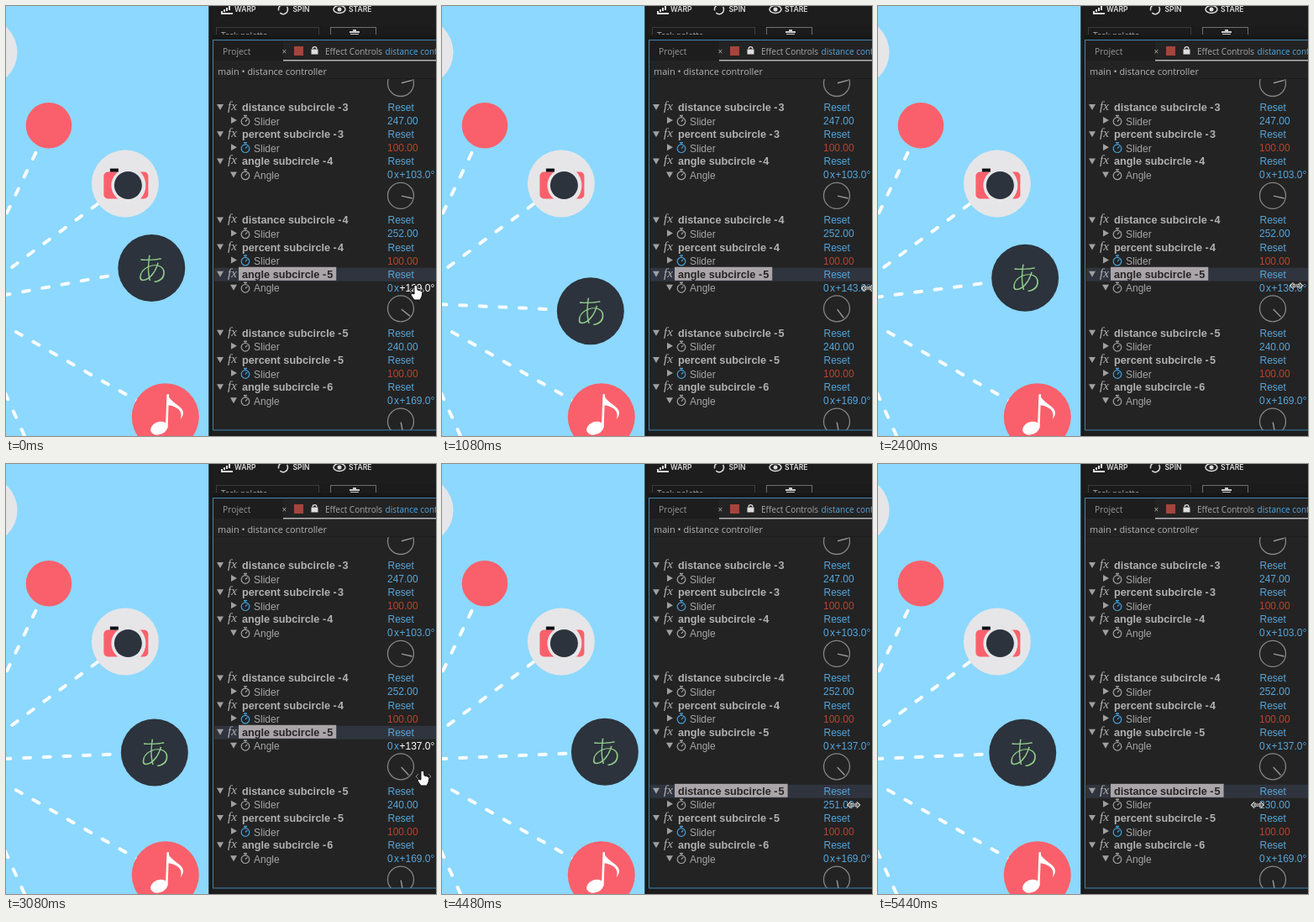
An HTML page with a canvas that plays this animation: 512 by 512 pixels, repeating every 5.48 s.

```html
<!DOCTYPE html>
<html>
<head>
<meta charset="utf-8">
<style>
html, body { margin: 0; width: 100%; height: 100%; overflow: hidden; background: #1a1a1a; }
canvas { display: block; }
</style>
</head>
<body>
<canvas id="stage" width="512" height="512"></canvas>
<script>
const g = document.getElementById('stage').getContext('2d');
const LOOP = 5480, STEP = 40, LAG = 400;
const HUB = { x: -50, y: 353 }, SCALE = 0.946, ANGLE_ZERO = 139.4;
const SANS = '"Liberation Sans", Arial, sans-serif';
const HUMAN = '"Open Sans", "Noto Sans", sans-serif';
const BLUE = '#56a7dc', RED = '#fa606b', DARK = '#2c333c', PALE = '#e6e6e9';

const angleKeys = [[0, 129], [80, 129], [600, 142], [1050, 143.4], [1260, 141], [1640, 133], [1950, 131.6], [2450, 137]];
const distKeys = [[3650, 240], [4000, 257], [4230, 260], [4500, 250.5], [4880, 238], [5060, 234.8], [5440, 230]];

function at(keys, t) {
  if (t <= keys[0][0]) return keys[0][1];
  for (let i = 1; i < keys.length; i++) {
    const [t0, a] = keys[i - 1], [t1, b] = keys[i];
    if (t < t1) return a + (b - a) * (t - t0) / (t1 - t0);
  }
  return keys[keys.length - 1][1];
}

function box(x, y, w, h, color) {
  g.fillStyle = color;
  g.fillRect(x, y, w, h);
}

function disc(x, y, r, color) {
  g.fillStyle = color;
  g.beginPath();
  g.arc(x, y, r, 0, 7);
  g.fill();
}

function ring(x, y, r, color, width = 1.3, from = 0, to = 2 * Math.PI) {
  g.strokeStyle = color;
  g.lineWidth = width;
  g.beginPath();
  g.arc(x, y, r, from, to);
  g.stroke();
}

function line(points, color, width = 1) {
  g.strokeStyle = color;
  g.lineWidth = width;
  g.beginPath();
  points.forEach(p => g.lineTo(...p));
  g.stroke();
}

function text(s, x, y, color, font = '12px ' + SANS) {
  g.font = font;
  g.fillStyle = color;
  g.fillText(s, x, y);
}

function clipped(x, y, w, h, draw) {
  g.save();
  g.beginPath();
  g.rect(x, y, w, h);
  g.clip();
  draw();
  g.restore();
}

function polar(angle, dist) {
  const a = (angle - ANGLE_ZERO) * Math.PI / 180;
  return [HUB.x + Math.cos(a) * dist * SCALE, HUB.y + Math.sin(a) * dist * SCALE];
}

function spoke(angle, dist) {
  const end = polar(angle, dist);
  g.save();
  g.lineCap = 'round';
  g.setLineDash([8, 15.7]);
  line([[HUB.x, HUB.y], end], '#fafdff', 4);
  g.restore();
  return end;
}

function camera(x, y) {
  disc(x, y, 40, PALE);
  g.fillStyle = RED;
  g.beginPath();
  g.roundRect(x - 25.5, y - 14, 53, 32, 5);
  g.fill();
  box(x - 9, y - 14, 26, 32, PALE);
  disc(x + 3.5, y + 2, 20, PALE);
  ring(x + 1, y + 2, 22.5, PALE, 2, -0.8, 0.8);
  disc(x + 3.5, y + 2, 16.5, DARK);
  box(x - 18, y - 18, 10, 4, '#0b0d10');
}

function note(x, y) {
  disc(x, y, 40, RED);
  g.fillStyle = '#fff';
  g.beginPath();
  g.ellipse(x - 7.5, y + 13.5, 10.5, 7.5, -0.4, 0, 7);
  g.fill();
  line([[x + 1.5, y + 13], [x + 3, y - 27]], '#fff', 2.6);
  g.beginPath();
  g.moveTo(x + 3, y - 27);
  g.bezierCurveTo(x + 6, y - 14, x + 30, y - 12, x + 18, y + 3);
  g.bezierCurveTo(x + 22, y - 8, x + 12, y - 13, x + 3, y - 14);
  g.fill();
}

// Trimming the outline gives the letter a light weight.
function kanaDisc(x, y) {
  disc(x, y, 40, DARK);
  g.textAlign = 'center';
  text('あ', x + 0.5, y + 14.5, '#90cb8b', '39px "Noto Sans CJK JP", "Noto Sans CJK", sans-serif');
  g.strokeStyle = DARK;
  g.lineWidth = 1.3;
  g.strokeText('あ', x + 0.5, y + 14.5);
  g.textAlign = 'left';
}

function drawComp(t) {
  const angle = Math.round(at(angleKeys, t - LAG));
  const dist = at(distKeys, t - LAG);
  clipped(0, 0, 241.5, 512, () => {
    box(0, 0, 242, 512, '#8cd8fe');
    disc(-27, 55, 40.5, PALE);
    spoke(205, 250);
    const red = spoke(75, 247), cam = spoke(103, 252);
    const kana = spoke(angle, dist), song = spoke(169, 291.5);
    disc(...red, 27.3, RED);
    camera(...cam);
    note(...song);
    kanaDisc(...kana);
  });
}

function drawHeader() {
  const caps = '600 8.6px Inter, sans-serif';
  for (let i = 0; i < 4; i++) box(256 + i * 3, 6 - i * 2, 2, 2 + i, '#ddd');
  box(256, 8, 14, 2, '#ddd');
  text('WARP', 272, 7, '#ddd', caps);
  ring(330, 4, 5.5, '#ddd', 1.5, -0.6, 2.3);
  ring(330, 4, 5.5, '#ddd', 1.5, 2.9, 4.6);
  text('SPIN', 341.5, 7, '#ddd', caps);
  g.strokeStyle = '#ddd';
  g.beginPath();
  g.ellipse(397, 4, 7, 4.5, 0, 0, 7);
  g.stroke();
  disc(397, 4, 2.5, '#ddd');
  text('STARE', 408, 7, '#ddd', caps);

  box(250, 24, 262, 11, '#1b1b1b');
  clipped(250, 24, 262, 10, () => {
    g.lineWidth = 1;
    g.strokeStyle = '#3c3c3c';
    g.strokeRect(250.5, 25.5, 122, 14);
    text('Task palette', 256, 38.5, '#aaa', '10px ' + HUMAN);
    g.strokeStyle = '#707070';
    g.strokeRect(386.5, 25.5, 54, 14);
    box(409, 30, 12, 2, '#ccc');
    box(413, 28, 4, 2, '#ccc');
    box(410, 33, 10, 3, '#ccc');
  });
  box(246, 35, 266, 5, '#171717');

  box(247, 41, 265, 464, '#232323');
  box(248, 42, 264, 23, '#1d1d1d');
  box(330, 42, 182, 23, '#232323');
  text('Project', 258, 58, '#999', '10.3px ' + HUMAN);
  text('×', 328.5, 57.5, '#aaa', '10px ' + HUMAN);
  box(343, 48, 11, 11, '#a4453b');
  box(363.5, 51.5, 8, 6, '#ddd');
  ring(367.5, 51, 2.4, '#ddd', 1.3, Math.PI, 2 * Math.PI);
  text('Effect Controls', 380, 58, '#a8a8a8', '10px ' + HUMAN);
  text('distance controller', 451.5, 58, BLUE, '10px ' + HUMAN);
  box(330, 64, 182, 1.5, '#b5b5b5');
  text('main • distance controller', 252, 82, '#b5b5b5', '10.9px ' + HUMAN);
  box(248, 86, 264, 1, '#1c1c1c');
}

function arrow(x, y, open) {
  g.fillStyle = '#a0a0a0';
  g.beginPath();
  const pts = open ? [[-4, -3], [4, -3], [0, 4]] : [[-3, -4], [4, 0], [-3, 4]];
  pts.forEach(([dx, dy]) => g.lineTo(x + dx, y + dy));
  g.fill();
}

function stopwatch(x, y, color) {
  ring(x, y + 0.5, 4.8, color, 1.2);
  line([[x - 2, y - 6.5], [x + 2, y - 6.5]], color, 1.4);
  line([[x, y - 6], [x, y - 4]], color, 1.2);
  line([[x, y + 0.5], [x + 2.4, y - 2]], color, 1.2);
}

function dial(y, angle) {
  const a = (angle - 90) * Math.PI / 180;
  ring(470, y, 15.5, '#858585');
  line([[470 + Math.cos(a), y + Math.sin(a)], [470 + Math.cos(a) * 14, y + Math.sin(a) * 14]], '#999', 1.4);
}

function effect(type, n, y, value, selected, hot) {
  const isAngle = type === 'angle', isPercent = type === 'percent';
  const label = `${type} subcircle -\u200a${n}`, font = 'bold 12.7px ' + SANS;
  if (selected) {
    box(248, y - 8, 264, 16, '#30343e');
    g.font = font;
    box(277, y - 9, g.measureText(label).width + 8, 16, '#aaa5a8');
  }
  arrow(255, y - 1, true);
  text('fx', 264, y + 3, '#b4b4b4', 'italic 15px "Liberation Serif", serif');
  text(label, 281, y + 4, selected ? '#242424' : '#b2b2b2', font);
  text('Reset', 454.5, y + 4, BLUE);

  const row = y + 16;
  arrow(271, row - 1, isAngle);
  stopwatch(285, row, isPercent ? '#479ed6' : '#a4a4a4');
  text(isAngle ? 'Angle' : 'Slider', 295, row + 4.5, '#a6a6a6');
  const color = hot ? '#fff' : isPercent ? '#b6432f' : BLUE;
  if (isAngle) {
    text('0', 454, row + 4, BLUE);
    text('x', 462, row + 4, BLUE);
    text(`+${value.toFixed(1)}°`, 468.5, row + 4, color);
    dial(y + 40.5, value);
  } else {
    text(value.toFixed(2), 454, row + 4, color);
  }
}

function drawEffects(t) {
  const angles = { 4: 103, 5: Math.round(at(angleKeys, t)), 6: 169 };
  const dists = { 3: 247, 4: 252, 5: Math.round(at(distKeys, t)) };
  const picked = t < 3480 ? 'angle' : 'distance';
  const hotAngle = t < 80 || (t > 2500 && t < 3200);
  const hotDist = t > 3400 && t < 3600;
  clipped(248, 87, 264, 418, () => {
    dial(92, 75);
    let y = 121;
    for (let n = 3; n <= 6; n++) {
      for (const type of ['angle', 'distance', 'percent']) {
        if (n === 3 && type === 'angle') continue;
        const value = type === 'angle' ? angles[n] : type === 'distance' ? dists[n] : 100;
        const five = n === 5;
        effect(type, n, y, value, five && type === picked,
          five && (type === 'angle' ? hotAngle : type === 'distance' && hotDist));
        y += type === 'angle' ? 70 : 32.2;
        if (n === 6) break;
      }
    }
  });
}

function dragCursor(x, y) {
  const shape = [[[x - 3, y - 3], [x - 6, y], [x - 3, y + 3]], [[x + 3, y - 3], [x + 6, y], [x + 3, y + 3]], [[x - 6, y], [x + 6, y]]];
  shape.forEach(s => line(s, '#e4e4e4', 3));
  shape.forEach(s => line(s, '#222', 1));
}

function handCursor(x, y) {
  g.save();
  g.translate(x, y);
  line([[-5, 1], [-8, 4], [-5, 7]], '#888');
  line([[7, 1], [10, 4], [7, 7]], '#888');
  g.beginPath();
  [[-2, -2], [0, -3], [1.5, -2], [2, 3], [6, 4], [8, 6], [7, 11], [5, 15], [-2, 15], [-6, 9], [-5, 7], [-2, 8]]
    .forEach(p => g.lineTo(...p));
  g.closePath();
  g.fillStyle = '#fff';
  g.fill();
  g.strokeStyle = '#111';
  g.lineWidth = 1;
  g.stroke();
  g.restore();
}

function drawCursor(t) {
  const handX = [[2500, 499], [3080, 496], [3460, 471]];
  const handY = [[2500, 335], [2800, 338], [3080, 368], [3460, 405]];
  if (t < 80) handCursor(488, 335);
  else if (t < 2500) dragCursor(488 + (at(angleKeys, t) - 129) * 1.36, t < 1200 ? 336 : 333);
  else if (t < 3600) handCursor(at(handX, t), at(handY, t));
  else dragCursor(470 + (at(distKeys, t) - 240) * 1.81, 406);
}

function frame() {
  const t = Math.floor(performance.now() % LOOP / STEP) * STEP;
  box(0, 0, 512, 512, '#1d1d1d');
  drawComp(t);
  drawHeader();
  drawEffects(t);
  box(241.5, 0, 4.5, 512, '#1a1a1a');
  g.strokeStyle = '#3f85b0';
  g.lineWidth = 1;
  g.strokeRect(246.5, 40.5, 300, 464.5);
  drawCursor(t);
  requestAnimationFrame(frame);
}
frame();
</script>
</body>
</html>
```
